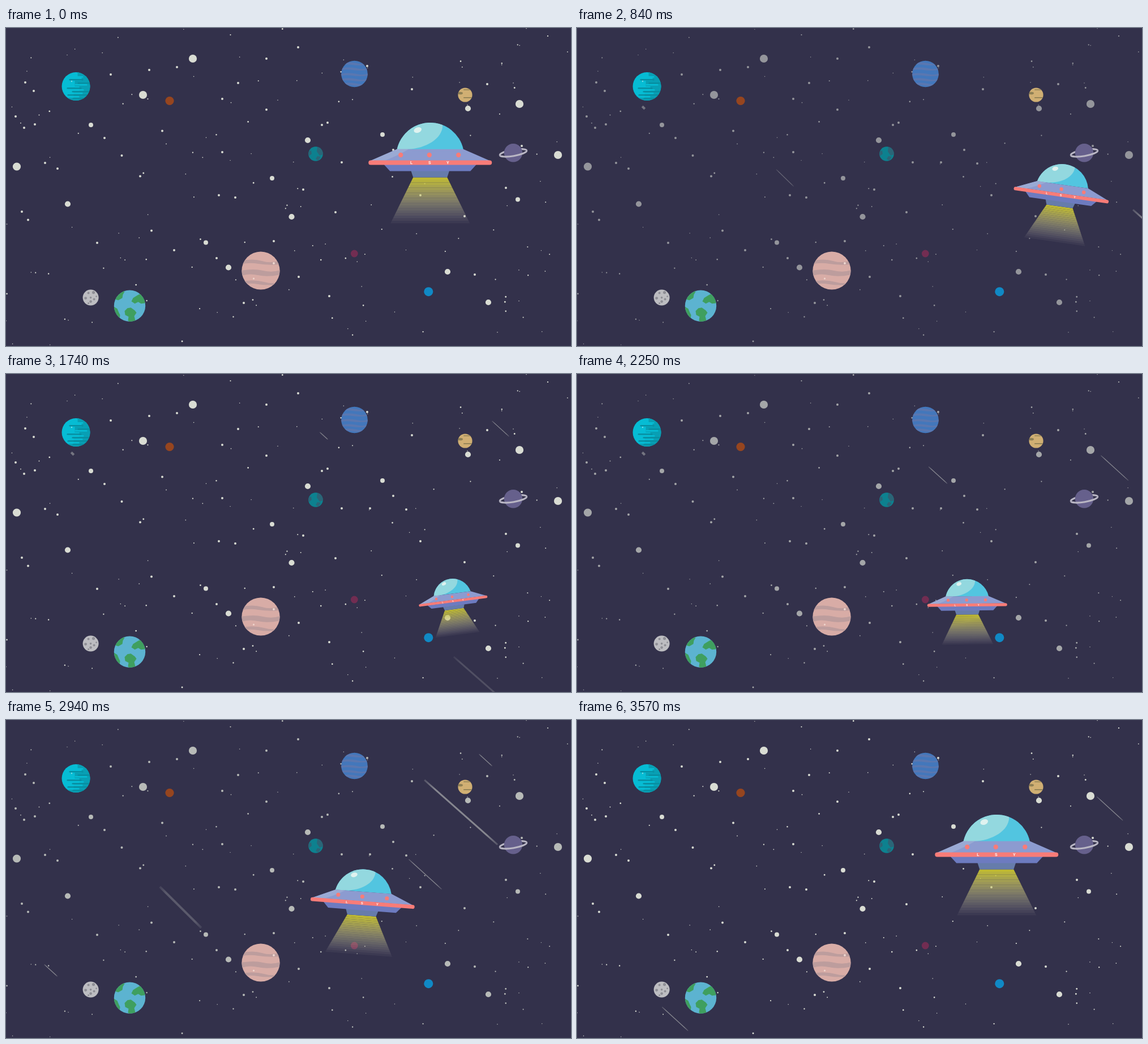
Write an HTML page with a canvas that moves like this. It is 998 by 561 pixels and loops after 3600 ms.

```html
<!DOCTYPE html>
<html lang="en">
<head>
<meta charset="utf-8">
<title>Flying saucer</title>
<style>
  html, body { margin: 0; width: 100%; height: 100%; overflow: hidden; background: #33314b; }
  canvas { display: block; }
</style>
</head>
<body>
<canvas id="stage" width="998" height="561"></canvas>
<script>
const ctx = document.getElementById('stage').getContext('2d');
const LOOP = 3600;
const TAU = Math.PI * 2;

// ---- drawing helpers ----
function ellipse(x, y, rx, ry, color, angle = 0) {
  ctx.fillStyle = color;
  ctx.beginPath();
  ctx.ellipse(x, y, rx, ry, angle, 0, TAU);
  ctx.fill();
}
const disc = (x, y, r, color) => ellipse(x, y, r, r, color);

function shape(path, color) {
  ctx.fillStyle = color;
  ctx.fill(new Path2D(path));
}

function bar(x, y, w, h, color) {
  ctx.fillStyle = color;
  ctx.beginPath();
  ctx.roundRect(x, y, w, h, h / 2);
  ctx.fill();
}

// Details are drawn relative to the centre and clipped to the disc.
function planet(x, y, r, color, details) {
  ctx.save();
  ctx.translate(x, y);
  disc(0, 0, r, color);
  if (details) {
    ctx.clip();
    details();
  }
  ctx.restore();
}

// ---- stars: main ones by radius, plus a seeded scatter of dust ----
const mainStars = {
  7.1: [330, 54, 242, 118, 19, 244.5, 907, 134, 975, 224],
  5.1: [109, 310.5, 504.5, 333, 816, 142, 533, 198, 393, 422.5, 780, 430, 852, 484],
  4: [150, 171, 470, 265, 353, 378.5, 665, 188, 904, 302.5],
  2: [185, 82, 32, 176, 51, 170, 174, 194, 204.5, 225, 276, 181.5, 382, 125, 382, 219,
    237, 261.5, 257, 357.5, 39, 338.5, 372, 406, 420, 485, 517, 439, 571, 473, 582, 325,
    525, 285, 593, 237, 558, 171, 568, 167, 638, 67, 850, 99, 732, 295, 810, 332,
    707, 239, 684, 215, 717, 108, 883, 282, 911, 208, 828, 435, 643, 237, 460, 54,
    516, 34, 376, 295, 405, 299, 473, 376, 253, 74, 302, 69, 410, 97, 460, 144,
    69, 238, 91, 248, 28, 324, 161, 379, 297, 392, 34, 96, 49, 111, 17, 156]
};
const starPath = new Path2D();
function addStar(x, y, r) {
  starPath.moveTo(x + r, y);
  starPath.arc(x, y, r, 0, TAU);
}
for (const [r, points] of Object.entries(mainStars))
  for (let i = 0; i < points.length; i += 2) addStar(points[i], points[i + 1], +r);

let seed = 7;
const random = () => (seed = seed * 16807 % 2147483647) / 2147483647;
for (let i = 0; i < 150; i++) addStar(random() * 998, random() * 561, 0.7 + 0.8 * random() ** 2);

function drawStars(t) {
  ctx.globalAlpha = 1 - 0.5 * Math.max(0, 1 - Math.abs(t % 1800 - 714) / 714);
  ctx.fillStyle = '#d9dcd3';
  ctx.fill(starPath);
  ctx.globalAlpha = 1;
}

// ---- meteors: straight flight, the tail at (x, y) when it begins ----
function meteor(t, m) {
  const { from, to, x, y, speed, length, grow = 0, slope, width, alpha, endAlpha = alpha } = m;
  if (t < from || t >= to) return;
  const age = t - from;
  const x1 = x + speed * age, y1 = y + slope * speed * age;
  const dx = length + grow * age;
  const x2 = x1 + dx, y2 = y1 + slope * dx;
  const tone = a => `rgba(217,220,211,${a})`;
  const a = alpha + (endAlpha - alpha) * age / (to - from);
  const fade = ctx.createLinearGradient(x1, y1, x2, y2);
  fade.addColorStop(0, tone(a * 0.4));
  fade.addColorStop(0.15, tone(a));
  fade.addColorStop(0.85, tone(a));
  fade.addColorStop(1, tone(a * 0.4));
  ctx.strokeStyle = fade;
  ctx.lineWidth = width;
  ctx.beginPath();
  ctx.moveTo(x1, y1);
  ctx.lineTo(x2, y2);
  ctx.stroke();
}

const thin = (from, to, x, y) =>
  ({ from, to, x, y, speed: 0.131, length: 0, grow: 0.0365, slope: 0.91, width: 1.3, alpha: 0.5 });
const thick = (from, to, x, y) =>
  ({ from, to, x, y, speed: 0.883, length: 129, slope: 0.884, width: 3, alpha: 0.5 });

const meteors = [
  thin(920, 2850, 751, -15),
  thin(1350, 2950, 503, 56),
  thin(2310, LOOP, 753, -15),
  thin(2310, LOOP, -15, 356),
  thick(260, 900, 469, -133),
  thick(2635, 3300, 469, -133),
  { from: 30, to: 1600, x: 305, y: 204, speed: 0.058, length: 29, grow: 0.002, slope: 0.97, width: 1.2, alpha: 0.5, endAlpha: 0.2 },
  { from: 850, to: 1900, x: 438, y: 189, speed: 0.396, length: 82, slope: 0.878, width: 3, alpha: 0.6, endAlpha: 0.1 },
  { from: 240, to: 2620, x: 115, y: 138, speed: 0, length: 5, slope: 1, width: 4, alpha: 0.4 },
  { from: 2620, to: 3350, x: 116, y: 140, speed: 0.485, length: 71, grow: 0.007, slope: 0.99, width: 4, alpha: 0.38, endAlpha: 0.06 }
];

// ---- planets ----
function drawPlanets() {
  planet(123.5, 103, 25, '#06bcd4', () => {
    const shade = '#078fa2';
    shape('M3 -30H30V30H-16V20H-4V10H6V0H-2V-10H10V-16H3Z', '#089fb4');
    [[-12, -13, 25], [3, -7, 24], [-16, 2, 26], [-7, 8, 34], [-15, 14, 36], [-6, 20, 30]]
      .forEach(([x, y, w]) => bar(x, y, w, 2.6, shade));
    [[-4, -18, 17], [-2, -4, 22], [-6, 5, 20], [-10, 11, 22], [-12, 17, 18]]
      .forEach(([x, y, w]) => bar(x, y, w, 2.4, '#06bcd4'));
    disc(-7.5, -9, 1.2, '#7fdce6');
  });
  planet(289, 128.5, 7.6, '#96451f');
  planet(615.5, 81, 23.3, '#4377bb', () => {
    for (const y of [-19, -10, 0, 9, 17])
      shape(`M-25 ${y}Q-8 ${y - 3} 4 ${y}T25 ${y - 1}V${y + 3}Q8 ${y + 5} -4 ${y + 3}T-25 ${y + 4}Z`, '#5a77b0');
  });
  planet(811, 118, 12.6, '#d0af73', () => {
    ellipse(-9, -3, 5, 2.3, '#8f8055');
    bar(-3, -10, 17, 2, '#a08c5c');
    bar(-3, 4, 16, 1.8, '#8f8055');
  });
  planet(547, 222, 12.8, '#0d818f', () => {
    shape('M3 -12L13 -8V1L7 3L2 -4Z M3 4L9 5L5 12L0 9Z M-13 -4L-8 -6L-7 0L-12 4Z', '#2b6577');
  });
  drawRingedPlanet();
  planet(450, 428, 33.6, '#d8aca6', () => {
    const band = '#bd9d9d';
    shape('M-35 -17Q-14 -22 2 -17T35 -18V-11Q14 -9 -4 -12T-35 -11Z', band);
    shape('M-35 0Q-12 -4 4 0T35 -1V7Q12 12 -5 8T-35 10Z', band);
    shape('M-35 19Q-12 15 6 20T35 19V24Q12 27 -5 24T-35 25Z', band);
    disc(23, -13, 1.9, '#f0d8d0');
    disc(-12.5, 14, 1.5, '#f0d8d0');
  });
  planet(615.3, 398, 6.4, '#722d52');
  planet(746.3, 465.2, 8, '#1089c5');
  planet(149.6, 475.6, 14, '#bdbdc1', () => {
    [[-4, -8, 2], [5, -9, 2.6], [-9, 1, 2.4], [0, 0, 1.8], [6, 3, 2], [0, 7, 2.3], [-4, 10, 1.5], [10, -2, 1.4]]
      .forEach(([x, y, r]) => disc(x, y, r, '#8e8e95'));
  });
  planet(218.5, 490.2, 27.7, '#5cb3d0', () => {
    const land = '#3f9f5f';
    shape('M-28 -12L-20 -10L-13 -14L-12 -20L-9 -25L-16 -30H-30Z', land);
    shape('M3 -8L6 -14L14 -19L20 -22L30 -12V-5L20 -4L15 -7L9 -4Z', land);
    shape('M-9 9L-4 4L2 3L9 8L12 12L8 18L10 26L2 30L-3 26L-2 19L-8 16Z', land);
    shape('M-30 0L-22 5L-19 12L-17 16L-18 25L-30 20Z', land);
  });
}

function drawRingedPlanet() {
  const x = 896, y = 220.3;
  const ring = (from, to) => {
    ctx.strokeStyle = '#b9b6c4';
    ctx.lineWidth = 3.2;
    ctx.beginPath();
    ctx.ellipse(x, y, 24, 5.5, -0.17, from, to);
    ctx.stroke();
  };
  ring(Math.PI, TAU);
  disc(x, y, 16.2, '#66608c');
  ring(0, Math.PI);
}

// ---- saucer: time, x, y, scale, degrees ----
const saucerKeys = [
  [0, 749, 237.5, 1, 0],
  [480, 818, 256.5, 0.873, 3.75],
  [1200, 863.3, 340.5, 0.684, 8.6],
  [1740, 790, 400.5, 0.56, -7.4],
  [2700, 630, 369, 0.787, 7.1],
  [3180, 650.5, 277, 0.904, 1.2],
  [3570, 741, 237.5, 1, 0]
];

function keyAt(i) {
  const n = saucerKeys.length;
  const turn = Math.floor(i / n);
  const [time, ...values] = saucerKeys[i - turn * n];
  return [time + turn * LOOP, ...values];
}

// Smooth periodic curve through the keys.
function saucerPose(t) {
  let i = saucerKeys.length - 1;
  while (saucerKeys[i][0] > t) i--;
  const [k0, k1, k2, k3] = [-1, 0, 1, 2].map(step => keyAt(i + step));
  const [h0, h1, h2] = [k1[0] - k0[0], k2[0] - k1[0], k3[0] - k2[0]];
  const u = (t - k1[0]) / h1;
  return [1, 2, 3, 4].map(c => {
    const [d0, d1, d2] = [(k1[c] - k0[c]) / h0, (k2[c] - k1[c]) / h1, (k3[c] - k2[c]) / h2];
    const m1 = (d0 * h1 + d1 * h0) / (h0 + h1) * h1;
    const m2 = (d1 * h2 + d2 * h1) / (h1 + h2) * h1;
    const rise = k2[c] - k1[c];
    return k1[c] + u * (m1 + u * (3 * rise - 2 * m1 - m2 + u * (m1 + m2 - 2 * rise)));
  });
}

function drawBeam() {
  const bands = 18, top = 26, height = 81 / bands;
  for (let i = 0; i < bands; i++) {
    const f = i / bands;
    const w1 = 30 + 40 * f, w2 = 30 + 40 * (i + 1) / bands;
    const y1 = top + i * height, y2 = y1 + height;
    shape(`M${-w1} ${y1}H${w1}L${w2} ${y2}H${-w2}Z`,
      `rgba(${202 + 20 * f},${197 + 21 * f},${50 + 170 * f},${0.92 * (1 - f)})`);
  }
}

function drawSaucer(t) {
  const [x, y, scale, degrees] = saucerPose(t);
  const coral = '#f87c78';
  ctx.save();
  ctx.translate(x, y);
  ctx.rotate(degrees * Math.PI / 180);
  ctx.scale(scale, scale);
  drawBeam();
  shape('M-34 14H34L30 26H-30Z', '#667cab');
  shape('M-82 3H82L71 15H-71Z', '#6d7bc0');
  shape('M-58.6 -23.5A60 60 0 0 1 58.6 -23.5Z', '#52c5e0');
  shape('M-58.6 -23.5A60 60 0 0 1 22 -66.3C22 -42 -8 -25 -40 -23.5Z', '#93d8df');
  ellipse(-22, -57.5, 7, 4.7, '#dff2ef', -0.35);
  shape('M-58.6 -23.7H58.6L105 -3.5H-105Z', '#8c9bd0');
  shape('M-58.6 -23.7H-38Q-54 -14 -80 -3.5H-105Z', '#9aaad4');
  for (const lamp of [-52, -1.5, 50]) disc(lamp, -13.5, 4.2, coral);
  bar(-109, -4, 218, 8, coral);
  ctx.fillStyle = '#fff';
  ctx.font = 'bold 7px "Liberation Sans", sans-serif';
  ctx.textAlign = 'center';
  [...'LSY'].forEach((letter, i) => ctx.fillText(letter, -33 + 32 * i, 2.7));
  ctx.restore();
}

function frame(now) {
  const t = now % LOOP;
  ctx.fillStyle = '#33314b';
  ctx.fillRect(0, 0, 998, 561);
  drawStars(t);
  meteors.forEach(m => meteor(t, m));
  drawPlanets();
  drawSaucer(t);
  requestAnimationFrame(frame);
}
requestAnimationFrame(frame);
</script>
</body>
</html>
```
